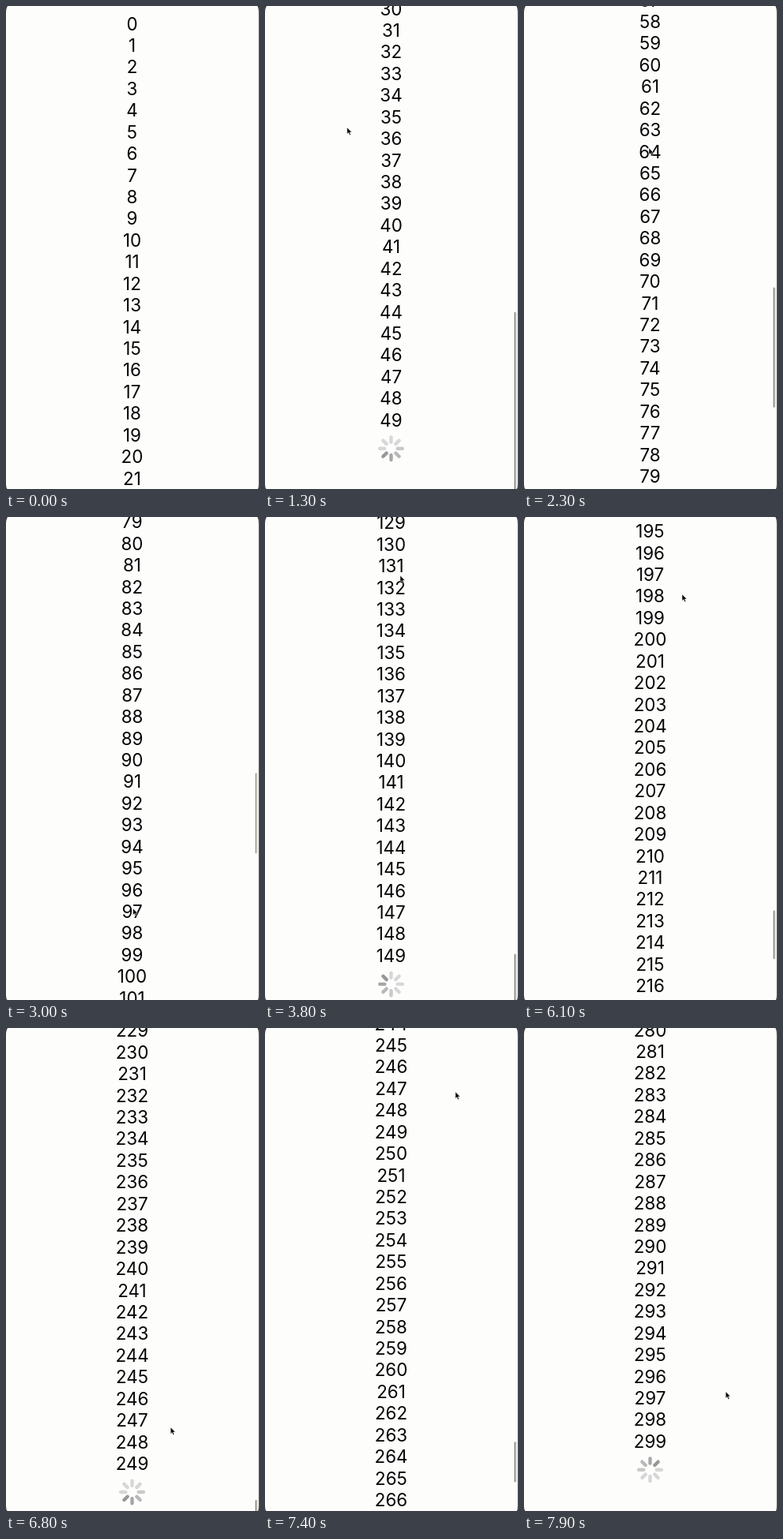
Animation of 320 by 612 pixels, one loop 8000 ms. Source, as an HTML page:

```html
<!DOCTYPE html>
<html lang="en">
<head>
<meta charset="utf-8">
<title>Endless number list</title>
<style>
  html, body { margin: 0; width: 100%; height: 100%; overflow: hidden; background: #fdfdfc; }
  svg { display: block; width: 100vw; height: 100vh; }
  text { font: 400 22.4px Inter, "Liberation Sans", sans-serif; text-anchor: middle; fill: #050505; }
</style>
</head>
<body>
<svg id="stage" viewBox="0 0 320 612">
  <rect width="320" height="612" fill="#fdfdfc"/>
  <g id="rows"></g>
  <g id="spinner"></g>
  <rect id="bar" x="315" width="2.6" rx="1.3" fill="#a6a69c"/>
  <rect x="319.3" width=".7" height="612" fill="#aaa"/>
  <path d="M0 0H2Q0 3 0 9ZM320 0H318Q320 3 320 9ZM0 612V606Q0 610 1.5 612ZM320 612V606Q320 610 318.5 612Z" fill="#333"/>
  <path id="cursor" d="M0 0V8.2L1.9 6.5L3.2 9.6L4.6 9L3.3 6H5.9Z" fill="#080808" stroke="#fdfdfc" stroke-width=".4"/>
</svg>
<script>
const LOOP = 8000, STEP = 100, PAGE = 50;
const PITCH = 27.43, FIRST = 22.5, VIEW = 612;

// Every swipe drags the list by the same distance and flings it at the same speed (px/ms)
const DRAG = 427, SPEED = 4.2, DECAY = 500, SPRING = 0.0132;
const DRAG_TIME = 2 * DRAG / SPEED;
const HOLD = 280, RETURN = 275, LOAD = 750;

// Release time and place of each swipe
const swipes = [
  { t: 950, x: 102, y: 85 },
  { t: 2207, x: 158, y: 180 },
  { t: 3501, x: 171, y: 69 },
  { t: 5049, x: 172, y: 25 },
  { t: 6099.6, x: 200, y: 98 },
  { t: 7400.5, x: 241, y: 79 },
  { t: 8200, x: 320, y: 79 }
];
const entry = { t: 100, x: 76, y: 73 };

const $ = id => document.getElementById(id);
const clamp = v => Math.max(0, Math.min(1, v));
const mix = (a, b, u) => a + (b - a) * u;
const smooth = u => u * u * (3 - 2 * u);
const dragged = (swipe, t) => clamp((t - swipe.t) / DRAG_TIME + 1) ** 2;
const bottom = page => page < 1 ? 0 : page * PAGE * PITCH - 561.5;

function add(parent, tag, attrs) {
  const el = document.createElementNS("http://www.w3.org/2000/svg", tag);
  set(el, attrs);
  parent.appendChild(el);
  return el;
}

function set(el, attrs) {
  for (const key in attrs) el.setAttribute(key, attrs[key]);
}

const rows = Array.from({ length: 25 }, () => add($("rows"), "text", { x: 159.5 }));
const petals = Array.from({ length: 8 }, (_, i) => add($("spinner"), "rect", {
  x: -2.2, y: -16.5, width: 4.4, height: 10.5, rx: 2.2,
  fill: "#66666a", transform: `rotate(${i * 45})`
}));

// Rest at the top, go back down, then drag up to the next release
function pointer(t) {
  const i = swipes.findIndex(s => s.t > t);
  const next = swipes[i], prev = swipes[i - 1];
  const from = prev || entry;
  const home = {
    x: prev ? mix(prev.x, next.x, 0.2) : 149,
    y: Math.min(next.y + DRAG, 512)
  };
  const back = smooth(clamp(prev ? (t - prev.t - HOLD) / RETURN : (t - entry.t) / 500));
  const pull = dragged(next, t);
  return ["x", "y"].map(k => mix(mix(from[k], home[k], back), next[k], pull));
}

// Drag, decaying fling, then a damped bounce past the end
function scrollAt(t) {
  const i = swipes.filter(s => t >= s.t - DRAG_TIME).length - 1;
  if (i < 0) return { pos: 0, alpha: 0 };
  const start = bottom(i), end = bottom(i + 1);
  const since = t - swipes[i].t;
  const room = end - start - DRAG, reach = SPEED * DECAY;
  const arrival = -DECAY * Math.log(1 - room / reach);
  const after = since - arrival;
  let pos = start + DRAG * dragged(swipes[i], t);
  if (after > 0) {
    pos = end + (SPEED - room / DECAY) * after * Math.exp(-SPRING * after);
  } else if (since > 0) {
    pos += reach * (1 - Math.exp(-since / DECAY));
  }
  return { pos, alpha: 1 - clamp((after - 450) / 250) };
}

function drawBar(pos, page, alpha) {
  const top = -40, track = 695, end = bottom(page);
  const scale = track / (end + VIEW);
  const y = top + pos * scale;
  const over = Math.max(0, pos - end);
  const tail = Math.min(y + VIEW * scale, top + track);
  const height = Math.max(6, VIEW * scale - over);
  set($("bar"), { y: tail - height, height, opacity: alpha });
}

function draw(t) {
  const page = 1 + swipes.filter(s => t >= s.t + LOAD).length;
  const count = PAGE * page;
  const { pos, alpha } = scrollAt(t);

  const top = Math.max(0, Math.floor(pos / PITCH) - 1);
  rows.forEach((row, i) => {
    const n = top + i;
    row.textContent = n < count ? n : "";
    row.setAttribute("y", FIRST + n * PITCH - pos + 8);
  });

  const y = FIRST + (count - 1) * PITCH + 36 - pos;
  set($("spinner"), { transform: `translate(159.5 ${y})` });
  const head = Math.floor(t / 97.4);
  petals.forEach((p, i) => {
    const age = (head - i + 8) % 8;
    p.setAttribute("opacity", Math.max(0.25, 0.68 - age * 0.11));
  });

  drawBar(pos, page, alpha);
  set($("cursor"), {
    transform: `translate(${pointer(t)})`,
    opacity: t < entry.t ? 0 : 1
  });
}

const begin = performance.now();
function tick() {
  const t = (performance.now() - begin) % LOOP;
  draw(Math.floor(t / STEP) * STEP);
  requestAnimationFrame(tick);
}
draw(0);
requestAnimationFrame(tick);
</script>
</body>
</html>
```
